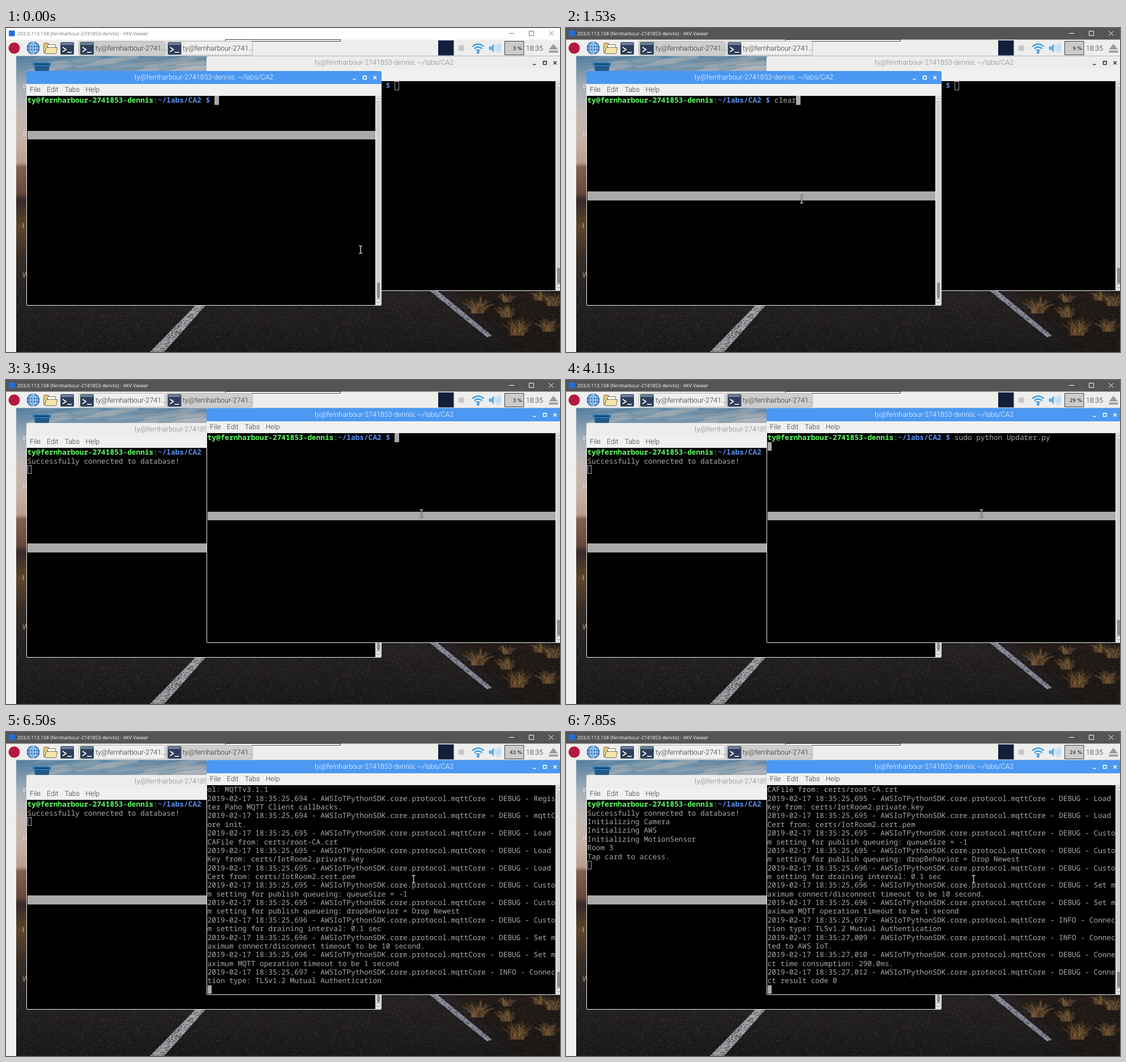
Recreate the animation shown at these times as an HTML page with a canvas. Size 978 by 573 pixels, loop 8 s.

```html
<!DOCTYPE html>
<html lang="en">
<head>
<meta charset="utf-8">
<title>Remote desktop session</title>
<style>
html, body { margin: 0; width: 100%; height: 100%; overflow: hidden; background: #efefef; }
#stage { position: relative; width: 978px; height: 573px; overflow: hidden; background: #efefef;
  font: 300 12.4px Roboto, sans-serif; text-rendering: geometricPrecision; }
#wall { position: absolute; left: 0; top: 0; }
#top { position: absolute; left: 0; top: 0; z-index: 5; }
#top text { white-space: pre; }
#caption { font: 400 8.6px "Open Sans", sans-serif; }
#cpu { font: 400 8.6px "DejaVu Sans", sans-serif; }

.win { position: absolute; width: 627px; height: 415px; background: #f0f0ef; border-radius: 4px 4px 2px 2px;
  overflow: hidden; z-index: 1; }
.win.on { z-index: 2; }
.title { height: 23px; line-height: 24px; text-align: center; background: #ededec; color: #858585; }
.on .title { background: #4b98f2; color: #fff; }
.win svg { position: absolute; left: 0; top: 0; color: #333; }
.win.on svg { color: #fff; }
.menu span { position: absolute; top: 25px; line-height: 17px; color: #333; }
.black { position: absolute; left: 1px; top: 44px; width: 615px; height: 370px; background: #000; }
.scroll { position: absolute; left: 617px; top: 44px; width: 9px; height: 370px; background: #d2d2d1; }
.scroll i { position: absolute; left: 2px; top: 330px; width: 5px; height: 28px; border-radius: 2px; background: #8e8e8e; }
.term { position: absolute; left: 1.6px; top: 44.4px; width: 614.4px; height: 368.6px; color: #aaa;
  font: 400 12.8px/15.36px "Noto Sans Mono", monospace; }
.term pre { position: absolute; left: 0; top: 0; margin: 0; font: inherit; }
.term b { color: #5fff5f; font-weight: 700; }
.term b + b { color: #5b92ee; }
.bar { position: absolute; left: 0; width: 100%; height: 15.36px; background: #aaa; }
.caret { position: absolute; box-sizing: border-box; width: 7.68px; height: 15.36px; border: 1px solid #aaa; }
.on .caret { background: #aaa; }

#pointer { position: absolute; left: -5px; top: -8px; z-index: 6; animation: move 8s infinite; }
@keyframes move {
  0%, .875% { transform: translate(626px, 392px); animation-timing-function: ease-in-out; }
  8.5%, 34% { transform: translate(416px, 303px); animation-timing-function: ease-in-out; }
  38.5%, 65% { transform: translate(733.5px, 236px); animation-timing-function: linear; }
  67.8%, 71.8% { transform: translate(719.5px, 257px); animation-timing-function: linear; }
  73.6%, 100% { transform: translate(719.5px, 260px); }
}
</style>
</head>
<body>
<div id="stage">
  <canvas id="wall" width="978" height="573"></canvas>

  <svg id="top" width="978" height="50">
    <defs>
      <g id="shell">
        <rect width="24" height="22" rx="2" fill="#2e4058"/>
        <rect x="1" y="1" width="22" height="4" rx="1" fill="#6f8299"/>
        <path d="M4 9l6 4-6 4M12 18h8" fill="none" stroke="#fff" stroke-width="1.7"/>
      </g>
    </defs>
    <rect y="20" width="978" height="29.5" fill="#eeeeed"/>
    <rect id="head" width="978" height="20.5"/>
    <rect x="5" y="4.5" width="10.5" height="10" fill="#1f6fe0"/>
    <text id="caption" x="20" y="13"></text>
    <path id="ctl" d="M888 9.5h9M923.5 5.5h8v8h-8zM958.5 5.5l8 8m0-8l-8 8" fill="none"/>
    <rect x="387.5" y="20.5" width="203" height="3" fill="#fff" stroke="#4a3a34"/>

    <circle cx="14.500" cy="35.500" r="10" fill="#b8173f"/>
    <g fill="none" stroke="#d6e8f8" stroke-width="1.2">
      <circle cx="48" cy="35.500" r="10.800" fill="#3f86c8" stroke="#2d6aa6"/>
      <ellipse cx="48" cy="35.500" rx="5" ry="10.500"/>
      <path d="M48 25v21M37.500 35.500h21M39.500 30h17M39.500 41h17"/>
    </g>
    <g stroke="#7d7250">
      <path d="M66.500 28.500q0-2 2-2h6l2 3h10v14h-20z" fill="#d9c982"/>
      <path d="M73.500 29.500h14v12h-14z" fill="#fff"/>
      <path d="M68.500 45.500l3-11h19l-2 11z" fill="#f1e6b2"/>
    </g>
    <use href="#shell" x="96" y="25"/>
    <rect id="taskL" x="128.500" y="23.500" width="152" height="24.500" rx="2" stroke="#b5b5b5"/>
    <rect id="taskR" x="282.500" y="23.500" width="152.500" height="24.500" rx="2" stroke="#b5b5b5"/>
    <use href="#shell" x="131" y="25"/>
    <use href="#shell" x="285.500" y="25"/>
    <g fill="#2c2c2c">
      <text class="task" x="158" y="40"></text>
      <text class="task" x="312" y="40"></text>
      <text x="918" y="40">18:35</text>
    </g>

    <rect x="763" y="22" width="27.500" height="26.500" fill="#10203c"/>
    <circle cx="804" cy="35.500" r="5.500" fill="#c6c6c6"/>
    <g fill="none" stroke="#2f97e8" stroke-width="2.300">
      <path d="M823.500 33a13.500 13.500 0 0 1 20 0M826.800 36.700a9 9 0 0 1 13.400 0M830 40.200a5 5 0 0 1 7 0"/>
      <circle cx="833.500" cy="43.200" r="1.200" fill="#2f97e8"/>
    </g>
    <path d="M852.500 32.500h4l5-5v16l-5-5h-4z" fill="#5fb0ee"/>
    <path d="M864 32a5 5 0 0 1 0 7M866.500 29.500a8.500 8.500 0 0 1 0 12M869 27a12 12 0 0 1 0 17" fill="none" stroke="#8cc8f4" stroke-width="1.400"/>
    <rect x="880.500" y="23.500" width="33.500" height="24" fill="#cbcbcb" stroke="#444"/>
    <text id="cpu" x="911" y="38.700" text-anchor="end" fill="#111"></text>
    <path d="M966.500 28l8 10h-16zM958.500 40h16v3.500h-16z" fill="#9a9a9a"/>
  </svg>

  <svg id="pointer" width="10" height="16" viewBox="-5 -8 10 16" fill="none">
    <path d="M-3-6.500h2l1 1 1-1h2M-3 6.500h2l1-1 1 1h2M0-6v12" stroke="#222" stroke-width="2.600"/>
    <path d="M-3-6.500h2l1 1 1-1h2M-3 6.500h2l1-1 1 1h2M0-6v12" stroke="#e4e4e4" stroke-width="1.200"/>
  </svg>
</div>

<script>
const LOOP = 8000, CW = 7.68, RH = 15.36, COLS = 80, ROWS = 24;
const HOST = 'fernharbour-2741853-dennis', USER = 'ty@' + HOST, DIR = '~/labs/CA2';
const $ = id => document.getElementById(id);
const stage = $('stage');

// Latest value in [[time, value], ...] that has begun at t
const at = (list, t) => list.reduce((v, [start, x]) => t >= start ? x : v, null);

// ---- wallpaper ----
function paintWall() {
  const g = $('wall').getContext('2d');
  let seed = 7;
  const rnd = () => (seed = (seed * 16807) % 2147483647) / 2147483647;
  const fade = (y0, y1, stops) => {
    const f = g.createLinearGradient(0, y0, 0, y1);
    stops.forEach(([y, c]) => f.addColorStop((y - y0) / (y1 - y0), c));
    return f;
  };
  const poly = (color, ...p) => {
    g.fillStyle = color;
    g.beginPath();
    for (let i = 0; i < p.length; i += 2) g.lineTo(p[i], p[i + 1]);
    g.fill();
  };

  g.fillStyle = fade(49, 573, [[49, '#54809f'], [75, '#7795ad'], [105, '#a9b0b6'], [150, '#c3b9b3'],
    [195, '#c6b2a6'], [238, '#bb9f90'], [246, '#80604f'], [292, '#684a3e'], [304, '#33292a'],
    [330, '#4a3828'], [350, '#5f4629'], [400, '#3a2f28'], [455, '#2a2626'], [573, '#191819']]);
  g.fillRect(18, 49, 960, 524);

  g.save();
  g.beginPath();
  g.rect(18, 49, 340, 29);
  g.clip();
  for (let i = 0; i < 46; i++) {
    const x = 60 + rnd() * 300, y = 50 + rnd() * 28;
    g.fillStyle = ['#c9c3bd', '#7f93a6', '#a5abb0'][i % 3];
    g.globalAlpha = .28;
    g.beginPath();
    g.ellipse(x, y, 18 + rnd() * 34, 2 + rnd() * 4, -.12, 0, 7);
    g.fill();
  }
  g.restore();

  // road: lines, dry verge, then grit over everything
  poly('#a3a4ab', 334, 491, 352, 491, 279, 573, 254, 573);
  poly('#8c92a1', 747, 464, 761, 464, 858, 544, 849, 547);
  poly('rgba(30,22,16,.6)', 790, 464, 978, 464, 978, 573, 905, 573);
  for (let i = 0; i < 26000; i++) {
    const x = 18 + rnd() * 960, y = 455 + rnd() * 118, v = 8 + rnd() ** 2 * 66 | 0;
    g.fillStyle = `rgba(${v + 7},${v + 2},${v},.5)`;
    g.fillRect(x | 0, y | 0, 1 + rnd() * 1.5, 1);
  }

  const tuft = (x, y, r) => {
    for (let i = 0; i < r * 4; i++) {
      const a = -Math.PI / 2 + (rnd() - .5) * 1.9, l = r * (.4 + rnd() * .7);
      const bx = x + (rnd() - .5) * r * .8;
      g.strokeStyle = ['#6f5434', '#503a25', '#8f6f46', '#3b2c1e'][i % 4];
      g.lineWidth = .7;
      g.beginPath();
      g.moveTo(bx, y);
      g.quadraticCurveTo(bx + Math.cos(a) * l * .3, y + Math.sin(a) * l * .8, bx + Math.cos(a) * l, y + Math.sin(a) * l);
      g.stroke();
    }
  };
  [[833, 505, 28], [884, 485, 17], [884, 512, 22], [902, 544, 30], [940, 482, 17], [966, 492, 24], [958, 537, 24]]
    .forEach(p => tuft(...p));

  // bin and clipped icon labels
  poly('#24598c', 50, 66, 77, 66, 75, 80, 52, 80);
  g.fillStyle = '#2f78b8';
  g.beginPath();
  g.roundRect(47, 61, 33, 6, 3);
  g.fill();
  g.fillStyle = '#123a5e';
  g.fillRect(51, 63, 25, 2);
  g.fillStyle = 'rgba(255,255,255,.8)';
  g.font = '300 12px Roboto, sans-serif';
  [['W', 107], ['n', 191], ['I', 354], ['W', 441]].forEach(([s, y]) => g.fillText(s, 29, y));
}

// ---- windows ----
function makeWindow(x, y) {
  const el = document.createElement('div');
  el.className = 'win';
  el.style.cssText = `left:${x}px;top:${y}px`;
  const menu = [['File', 6], ['Edit', 36], ['Tabs', 67.5], ['Help', 104.5]]
    .map(([s, l]) => `<span style="left:${l}px">${s}</span>`).join('');
  el.innerHTML = `<div class="title">${USER}: ${DIR}</div>
    <svg width="627" height="23" fill="none" stroke="currentColor" stroke-width="1.6">
      <path d="M576 14.500h5.500M594.500 9h5.500v5.500h-5.500zM594 8.800h6.500M612.500 9l5.500 5.500m0-5.500l-5.500 5.500"/></svg>
    <div class="menu">${menu}</div><div class="black"></div>
    <div class="scroll"><i></i><svg width="9" height="370" style="color:#666">
      <path d="M.5.500h8v9h-8zM.5 360.500h8v9h-8z" fill="#f4f4f4" stroke="#bbb"/>
      <path d="M2 6.500l2.500-3 2.500 3M2 363.500l2.500 3 2.500-3" fill="none" stroke="currentColor"/></svg></div>
    <div class="term"><pre></pre><div class="bar"></div><div class="caret"></div></div>`;
  stage.append(el);
  const [pre, bar, caret] = el.querySelector('.term').children;
  let shown;
  return (text, barRow, on) => {
    const key = text + barRow + on;
    if (key === shown) return;
    shown = key;
    el.classList.toggle('on', on);
    bar.style.display = barRow < 0 ? 'none' : '';
    bar.style.top = barRow * RH + 'px';
    const all = text.split('\n').flatMap(s => s.match(/.{1,80}/g) || ['']);
    const rows = all.slice(-ROWS), last = rows[rows.length - 1];
    caret.style.left = Math.min(last.length, COLS - 1) * CW + 'px';
    caret.style.top = (rows.length - 1) * RH + 'px';
    pre.innerHTML = rows.join('\n').replace(PROMPT, `<b>${USER}</b>:<b>${DIR} $</b> `);
  };
}

// ---- script of the session ----
const PROMPT = `${USER}:${DIR} $ `;
const OK = 'Successfully connected to database!\n';
const runL = PROMPT + 'sudo python SmartSecurity.py ';
const runR = PROMPT + 'sudo python Updater.py ';
const log = (ms, msg, level = 'DEBUG') =>
  `2019-02-17 18:35:${ms} - AWSIoTPythonSDK.core.protocol.mqttCore - ${level} - ${msg}\n`;

const setup = 'ol: MQTTv3.1.1\n' +
  log('25,694', 'Register Paho MQTT Client callbacks.') +
  log('25,694', 'mqttCore init.') +
  log('25,695', 'Load CAFile from: certs/root-CA.crt') +
  log('25,695', 'Load Key from: certs/IotRoom2.private.key') +
  log('25,695', 'Load Cert from: certs/IotRoom2.cert.pem') +
  log('25,695', 'Custom setting for publish queueing: queueSize = -1') +
  log('25,695', 'Custom setting for publish queueing: dropBehavior = Drop Newest') +
  log('25,696', 'Custom setting for draining interval: 0.1 sec') +
  log('25,696', 'Set maximum connect/disconnect timeout to be 10 second.') +
  log('25,696', 'Set maximum MQTT operation timeout to be 1 second') +
  log('25,697', 'Connection type: TLSv1.2 Mutual Authentication', 'INFO');
const joined = setup +
  log('27,009', 'Connected to AWS IoT.', 'INFO') +
  log('27,010', 'Connect time consumption: 290.0ms.') +
  log('27,012', 'Connect result code 0');

const bootL = runL + '\n' + OK;
const camera = bootL + 'Initializing Camera\n';
const aws = camera + 'Initializing AWS\n';
const motion = aws + 'Initializing MotionSensor\n';

const CLICK = 760, SWAP = 3190, LOG = 6500;
const leftText = [[0, PROMPT], [1530, PROMPT + 'clear'], [1700, runL], [2250, runL + '\n'], [2720, bootL],
  [6750, camera], [7050, aws], [7750, motion], [7850, motion + 'Room 3\nTap card to access.\n']];
const rightText = [[0, PROMPT], [3650, PROMPT + 'clear'], [3800, runR], [4110, runR + '\n'],
  [4570, runR + '\n' + OK], [LOG, setup], [7750, joined]];
const leftBar = [[0, 4], [CLICK, 11]];
const rightBar = [[0, -1], [SWAP, 9], [LOG, -1]];
const load = [[0, 3], [820, 9], [2320, 3], [3880, 29], [5350, 43], [6820, 24]];

paintWall();
const right = makeWindow(354, 50), left = makeWindow(36, 76);
$('caption').textContent = `203.0.113.158 (${HOST}) - XKV Viewer`;
document.querySelectorAll('.task').forEach(e => e.textContent = USER.slice(0, 19) + '...');

function draw(t) {
  const swapped = t >= SWAP, active = t >= CLICK;
  left(at(leftText, t), at(leftBar, t), !swapped);
  right(at(rightText, t), at(rightBar, t), swapped);
  $('taskL').setAttribute('fill', swapped ? '#efefee' : '#cdcdcd');
  $('taskR').setAttribute('fill', swapped ? '#cdcdcd' : '#efefee');
  $('head').setAttribute('fill', active ? '#555' : '#fff');
  $('caption').setAttribute('fill', active ? '#fff' : '#777');
  $('ctl').setAttribute('stroke', active ? '#fff' : '#777');
  $('cpu').textContent = at(load, t) + ' %';
}

const begin = performance.now();
function tick() {
  draw((performance.now() - begin) % LOOP);
  requestAnimationFrame(tick);
}
tick();
</script>
</body>
</html>
```
